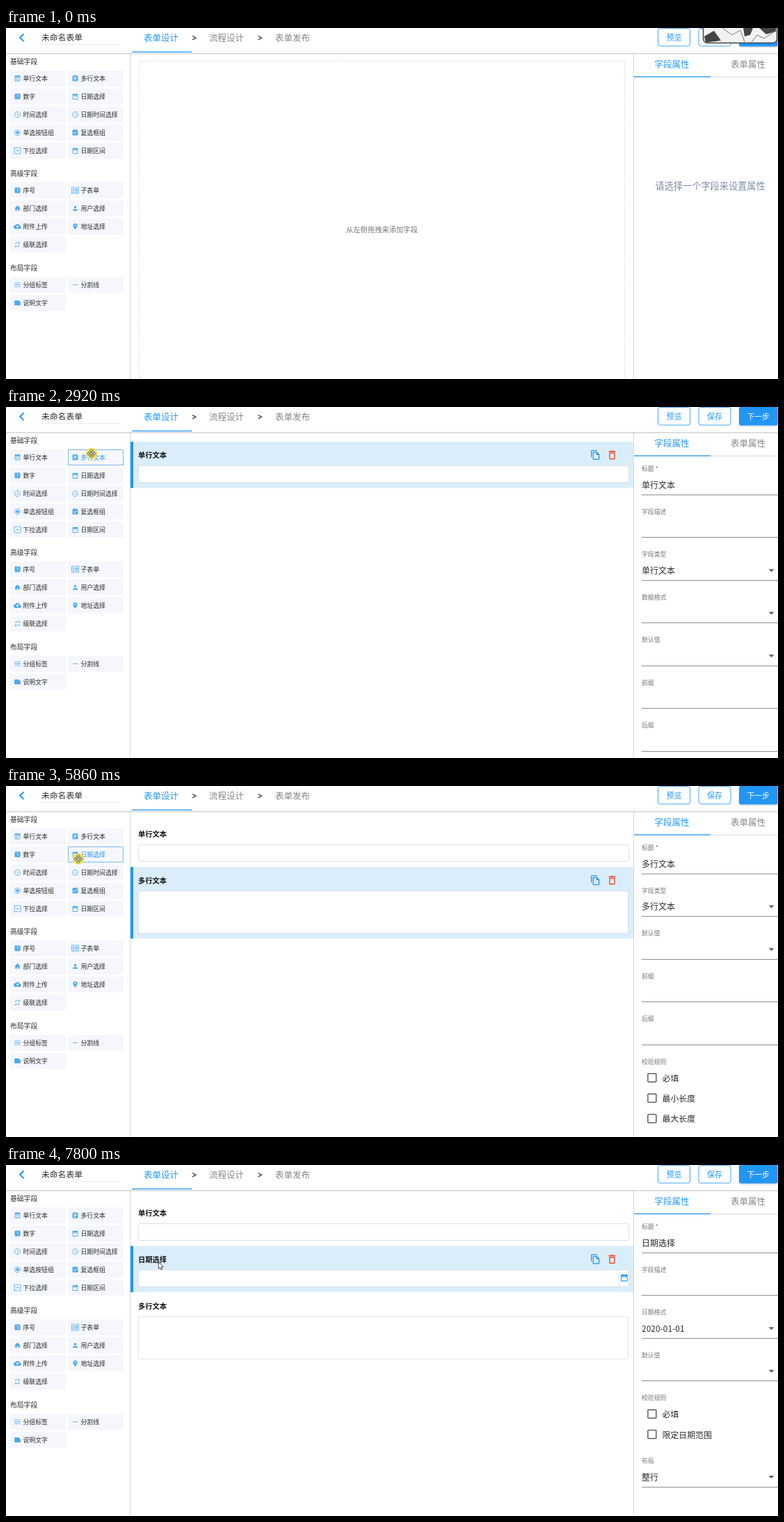
An HTML page that plays this animation: 1110 px wide and 505 px high, repeating every 8000 ms.

```html
<!DOCTYPE html>
<html lang="zh-CN">
<head>
<meta charset="utf-8">
<title>表单设计</title>
<style>
  html, body { margin: 0; width: 100%; height: 100%; overflow: hidden; background: #fff; }
  svg { display: block; }
  text { font-family: "Noto Sans CJK SC", "Noto Sans CJK", "Noto Sans", sans-serif; fill: #2a2a2a; white-space: pre; }
  .off { display: none; }
  .icon { fill: #4ba8f1; fill-rule: evenodd; }
  .item rect { fill: #f5f7fc; stroke: #f5f7fc; }
  .item.hot rect { stroke: #3c97e3; stroke-dasharray: 2 1; }
  .item.hot text { fill: #2f97ec; }
  text.blue, .blue { fill: #2196f3; }
  text.grey { fill: #858585; }
  text.label { fill: #757575; }
  text.hint { fill: #7f8ea6; }
  text.white { fill: #fff; }
  text.bold { font-weight: 700; fill: #111; }
  .thin { font-weight: 300; }
  .input { fill: #fff; stroke: #dcdfe3; }
  .tool { fill-rule: evenodd; }
</style>
</head>
<body>
<svg id="stage" width="1110" height="505" xmlns="http://www.w3.org/2000/svg"></svg>
<script>
const LOOP = 8000;

// Icons on a 24 unit grid
const SQUARE = 'M19 3H5a2 2 0 0 0-2 2v14a2 2 0 0 0 2 2h14a2 2 0 0 0 2-2V5a2 2 0 0 0-2-2z';
const RING = 'M12 2a10 10 0 1 0 0 20 10 10 0 0 0 0-20zm0 18a8 8 0 1 1 0-16 8 8 0 0 1 0 16z';
const ICONS = {
  note: 'M17 10H7v2h10zm2-7h-1V1h-2v2H8V1H6v2H5a2 2 0 0 0-2 2v14a2 2 0 0 0 2 2h14a2 2 0 0 0 2-2V5a2 2 0 0 0-2-2zm0 16H5V8h14zm-5-5H7v2h7z',
  task: 'M19 3h-4.2a3 3 0 0 0-5.6 0H5a2 2 0 0 0-2 2v14a2 2 0 0 0 2 2h14a2 2 0 0 0 2-2V5a2 2 0 0 0-2-2zm-7 0a1 1 0 1 1 0 2 1 1 0 0 1 0-2zm2 14H7v-2h7zm3-4H7v-2h10zm0-4H7V7h10z',
  one: SQUARE + 'M14 17h-2V9h-2V7h4z',
  date: 'M19 4h-1V2h-2v2H8V2H6v2H5a2 2 0 0 0-2 2v14a2 2 0 0 0 2 2h14a2 2 0 0 0 2-2V6a2 2 0 0 0-2-2zm0 16H5V9h14zM7 11h2v2H7zm4 0h2v2h-2zm4 0h2v2h-2z',
  time: RING + 'M12.5 7H11v6l5.2 3.1.8-1.2-4.5-2.7z',
  radio: RING + 'M12 7a5 5 0 1 0 0 10 5 5 0 0 0 0-10z',
  check: SQUARE + 'M10 17l-5-5 1.4-1.4 3.6 3.6 7.6-7.6L19 8z',
  drop: 'M1 1h22v22H1zM3 3v18h18V3zM7 10h10l-5 5z',
  sub: 'M0 1h24v22H0zM2 3v18h20V3zM4 6h6v2H4zM4 11h6v2H4zM4 16h6v2H4zM12 6h8v7h-8zM14 8v3h4V8zM12 16h8v2h-8z',
  home: 'M10 20v-6h4v6h5v-8h3L12 3 2 12h3v8z',
  user: 'M12 12a4 4 0 1 0 0-8 4 4 0 0 0 0 8zm0 2c-2.7 0-8 1.3-8 4v2h16v-2c0-2.7-5.3-4-8-4z',
  cloud: 'M19.4 10A7.5 7.5 0 0 0 5.4 8 6 6 0 0 0 6 20h13a5 5 0 0 0 .4-10zM14 13v4h-4v-4H7l5-5 5 5z',
  place: 'M12 2a7 7 0 0 0-7 7c0 5.2 7 13 7 13s7-7.8 7-13a7 7 0 0 0-7-7zm0 9.5a2.5 2.5 0 1 1 0-5 2.5 2.5 0 0 1 0 5z',
  loop: 'M7 7h10v3l4-4-4-4v3H5v6h2zm10 10H7v-3l-4 4 4 4v-3h12v-6h-2z',
  lines: 'M2 5h20v2H2zM2 11h20v2H2zM2 17h20v2H2z',
  minus: 'M4 11h16v2H4z',
  memo: 'M22 10l-6-6H4a2 2 0 0 0-2 2v12a2 2 0 0 0 2 2h16a2 2 0 0 0 2-2z',
  copy: 'M16 1H4a2 2 0 0 0-2 2v14h2V3h12zm-1 4H8a2 2 0 0 0-2 2v14a2 2 0 0 0 2 2h11a2 2 0 0 0 2-2V11zM8 21V7h6v5h5v9z',
  bin: 'M6 19a2 2 0 0 0 2 2h8a2 2 0 0 0 2-2V7H6zM8 9h8v10H8zm7.5-5-1-1h-5l-1 1H5v2h14V4z'
};

// Text is placed by the vertical middle of its glyphs
const text = (x, cy, size, str, cls = '') =>
  `<text x="${x}" y="${cy + size * 0.38}" font-size="${size}" class="${cls}">${str}</text>`;
const rect = (x, y, w, h, attrs) => `<rect x="${x}" y="${y}" width="${w}" height="${h}" ${attrs}/>`;
const stroke = (d, color, attrs = '') => `<path d="${d}" fill="none" stroke="${color}" ${attrs}/>`;
const icon = (name, cx, cy, size, attrs = 'class="icon"') =>
  `<path d="${ICONS[name]}" transform="translate(${cx - size / 2} ${cy - size / 2}) scale(${size / 24})" ${attrs}/>`;
const group = (id, body) => `<g id="${id}">${body}</g>`;

// Field palette: title, title middle, top of the first item, items
const GROUPS = [
  ['基础字段', 48, 61.5, [['单行文本', 'note'], ['多行文本', 'task'], ['数字', 'one'], ['日期选择', 'date'],
    ['时间选择', 'time'], ['日期时间选择', 'time'], ['单选按钮组', 'radio'], ['复选框组', 'check'],
    ['下拉选择', 'drop'], ['日期区间', 'date']]],
  ['高级字段', 209.5, 222.5, [['序号', 'one'], ['子表单', 'sub'], ['部门选择', 'home'], ['用户选择', 'user'],
    ['附件上传', 'cloud'], ['地址选择', 'place'], ['级联选择', 'loop']]],
  ['布局字段', 345.5, 358.5, [['分组标签', 'lines'], ['分割线', 'minus'], ['说明文字', 'memo']]]
];
const items = GROUPS.flatMap(([, , top, list]) => list.map(([name, pic], i) =>
  ({ name, pic, x: i % 2 ? 89.5 : 6.5, y: top + (i >> 1) * 26 })));

const item = ({ name, pic, x, y }, id, cls) =>
  `<g id="${id}" class="${cls}" transform="translate(${x} ${y})">` +
  rect(0, 0, 79, 22, '') + icon(pic, 10, 11, 10.5) + text(18, 11.2, 8.9, name) + '</g>';

const palette = GROUPS.map(([title, cy]) => text(6, cy, 9.8, title)).join('') +
  items.map((it, i) => item(it, 'item' + i, 'item')).join('');

// Header
const button = (x, label) =>
  rect(x + 0.5, 0.5, 46, 25.5, 'rx="3" fill="#fff" stroke="#42a5f5"') + text(x + 12.5, 13.5, 11, label, 'blue');
const header =
  rect(0, 0, 1110, 36, 'fill="#fff" filter="url(#shade)"') +
  stroke('M25.5 8.5L20 13.8l5.5 5.3', '#2196f3', 'stroke-width="2"') +
  text(51, 14, 11.8, '未命名表单') +
  stroke('M51 23.5H165', '#d5d5d5', 'stroke-dasharray="1 1"') +
  text(198, 14.5, 12.5, '表单设计', 'blue thin') + text(292, 14.5, 12.5, '流程设计', 'grey thin') +
  text(387, 14.5, 12.5, '表单发布', 'grey thin') +
  stroke('M268 11.5l5 2.7-5 2.7M362.5 11.5l5 2.7-5 2.7', '#333', 'stroke-width="1.2"') +
  rect(181, 33.8, 86, 1.3, 'class="blue"') +
  button(937, '预览') + button(995.5, '保存') +
  rect(1054, -0.5, 55.5, 27, 'rx="3" class="blue" filter="url(#shade)"') +
  text(1065.5, 13.5, 10.8, '下一步', 'white');

const picture = group('picture',
  rect(1002.5, -8, 106, 29.5, 'rx="6" fill="#f2f2f2" stroke="#444" stroke-width="1.5"') +
  '<path d="M1004 12l14-8 10 14-22 3zM1060 0h14l-4 10-8 2zM1083 0h24v5l-14 4z" fill="#444"/>' +
  stroke('M1030 0l14 10 12-7 6 17M1072 20l8-10 10 5 14-9', '#777'));

// Canvas cards
const tools = cy => icon('copy', 847.5, cy, 15.5, 'class="tool" fill="#2196f3"') +
  icon('bin', 871.5, cy, 17, 'class="tool" fill="#e8502f"');
const card = (y, h, title, selected, body) =>
  `<g transform="translate(0 ${y})">` +
  (selected ? rect(179, 0, 723, h, 'fill="#daedfb"') + rect(179, 0, 4, h, 'class="blue"') + tools(19) : '') +
  text(190, 19.5, 10.25, title, 'bold') + body + '</g>';
const line = selected => card(50, 66.5, '单行文本', selected, rect(190.5, 34.5, 705, 24, 'rx="2" class="input"'));
const area = (y, selected) => card(y, 103, '多行文本', selected, rect(190.5, 34.5, 704, 61, 'rx="2" class="input"'));
const day = y => card(y, 66.5, '日期选择', true,
  rect(190.5, 34.5, 705, 24, 'rx="2" class="input"') +
  stroke('M881.5 35v23', '#dcdfe3') + icon('date', 889, 45.5, 13, 'class="tool" fill="#2196f3"'));

const empty = rect(191.5, 47.5, 698, 480, 'fill="none" stroke="#dedede" stroke-dasharray="3 2"') +
  text(489, 290.2, 10.3, '从左侧拖拽来添加字段', 'label');
const slot = group('slot',
  rect(179.5, 116.5, 722, 28, 'fill="#fefefe" stroke="#a3c0d6" stroke-dasharray="2 1"'));

// Property panels
const prop = (row, label, value = '', select = false, shift = 0) => {
  const y = 88.8 + row * 61.5 + shift;
  return text(914, y, 8.9, label, 'label') + text(914, y + 23.5, 12, value) +
    stroke(`M914 ${Math.round(y + 37) + 0.5}H1110`, '#8f8f8f') +
    (select ? `<path d="M1096.5 ${y + 21.5}h8l-4 4z" fill="#616161"/>` : '');
};
const rules = (row, names) => {
  const y = 88.8 + row * 61.5;
  return text(914, y, 8.9, '校验规则', 'label') + names.map((name, i) => {
    const cy = y + 23.5 + i * 29.3;
    return rect(922.9, cy - 6, 12, 12, 'rx="1" fill="none" stroke="#5f5f5f" stroke-width="1.5"') +
      text(943.5, cy + 0.5, 11.9, name);
  }).join('');
};
const panels = [
  text(933.5, 226.5, 13.2, '请选择一个字段来设置属性', 'hint thin'),
  prop(0, '标题 *', '单行文本') + prop(1, '字段描述') + prop(2, '字段类型', '单行文本', true) +
    prop(3, '数据格式', '', true) + prop(4, '默认值', '', true) + prop(5, '前缀') + prop(6, '后缀'),
  prop(0, '标题 *', '多行文本') + prop(1, '字段类型', '多行文本', true) + prop(2, '默认值', '', true) +
    prop(3, '前缀') + prop(4, '后缀') + rules(5, ['必填', '最小长度', '最大长度']),
  prop(0, '标题 *', '日期选择') + prop(1, '字段描述') + prop(2, '日期格式', '2020-01-01', true) +
    prop(3, '默认值', '', true) + rules(4, ['必填', '限定日期范围']) + prop(5, '布局', '整行', true, 29.3)
];
const sides =
  stroke('M178.5 36V505M902.5 36V505M1013 70.5H1110', '#d9d9d9') +
  rect(903, 69.6, 110, 1.3, 'class="blue"') +
  text(932.5, 52.5, 12.5, '字段属性', 'blue thin') + text(1042, 52.5, 12.5, '表单属性', 'grey thin');

// Pointer
const CROSS = 'M0-6.5l2.5 2.7H.8V-.8H3.8V-2.5L6.5 0 3.8 2.5V.8H.8V3.8H2.5L0 6.5-2.5 3.8H-.8V.8H-3.8V2.5L-6.5 0-3.8-2.5V-.8H-.8V-3.8H-2.5z';
const pointer = group('pointer',
  '<circle id="halo" r="8.3" fill="#f3e83c" opacity=".85"/>' +
  `<path id="mover" d="${CROSS}" fill="#fff" stroke="#333" stroke-width=".8"/>` +
  '<path id="arrow" d="M.3.3V9.8L2.6 7.8 4.1 11.2 5.7 10.5 4.3 7.2H7.2z" fill="#fff" stroke="#333" stroke-width=".9"/>');

const scenes = [empty, line(true), line(false) + group('lower', area(116.5, true)),
  line(false) + day(116.5) + area(183.5, false)];

// Drags: palette item, start, end, grip offset
const DRAGS = [[0, 1320, 2010, -34, -5.5], [1, 2920, 3700, -34, -6], [3, 6320, 7800, -16, -15]];
const PRESSES = [[1170, 2010], [2920, 3620], [5860, 7710]];

// Pointer legs: start, end, steps, target x, target y, bow
const LEGS = [
  [70, 850, 11, 40.5, 66, 0], [1320, 1860, 8, 340, 93, 0], [2010, 2770, 11, 123, 67, 0],
  [2920, 3460, 8, 305, 168, 0], [3620, 4390, 11, 46, 99, 0], [5000, 5310, 5, 103, 104, 0],
  [5690, 5690, 1, 104, 105, 0], [6320, 7110, 11, 215.5, 142, 21], [7170, 7250, 2, 219, 139.5, 0]
];

document.getElementById('stage').innerHTML =
  '<defs><filter id="shade" x="-10%" y="-20%" width="120%" height="160%">' +
  '<feDropShadow dx="0" dy="1" stdDeviation="1" flood-opacity=".25"/></filter></defs>' +
  palette + sides + scenes.map((s, i) => group('scene' + i, s)).join('') + slot +
  panels.map((p, i) => group('panel' + i, p)).join('') + header + picture +
  DRAGS.map(([n], i) => item(items[n], 'ghost' + i, 'item hot')).join('') + pointer;

const el = id => document.getElementById(id);
const show = (id, on) => el(id).classList.toggle('off', !on);
const move = (id, x, y) => el(id).setAttribute('transform', `translate(${x} ${y})`);
const within = (v, a, b) => v >= a && v < b;

function pointerAt(t) {
  let x = 950, y = 406;
  for (const [t0, t1, n, tx, ty, bow] of LEGS) {
    if (t < t0) break;
    // The picture refreshes in discrete steps along each leg
    const k = n > 1 ? Math.min(1, Math.floor((t - t0) / (t1 - t0) * (n - 1) + 0.1) / (n - 1)) : 1;
    const p = k * k * (3 - 2 * k);
    x += (tx - x) * p;
    y += (ty - y) * p + bow * Math.sin(Math.PI * p);
  }
  return [x, y];
}

function draw(t) {
  const [x, y] = pointerAt(t);
  const stage = DRAGS.filter(([, , end]) => t >= end).length;
  const drag = DRAGS.findIndex(([, a, b]) => within(t, a, b));
  const pressed = PRESSES.some(([a, b]) => within(t, a, b));
  const hover = drag < 0 && t >= 70
    ? items.findIndex(it => within(x, it.x, it.x + 80) && within(y, it.y, it.y + 23)) : -1;
  const opening = drag > 0 && x > 184;

  scenes.forEach((_, i) => { show('scene' + i, i === stage); show('panel' + i, i === stage); });
  items.forEach((_, i) => el('item' + i).classList.toggle('hot', i === hover));
  DRAGS.forEach(([, , , dx, dy], i) => {
    show('ghost' + i, i === drag);
    if (i === drag) move('ghost' + i, Math.round(x + dx) + 0.5, Math.round(y + dy) + 0.5);
  });
  show('slot', opening);
  move('lower', 0, opening ? 29 : 0);
  show('picture', t < 1170);
  show('pointer', t >= 70);
  show('halo', pressed);
  show('mover', pressed || hover >= 0);
  show('arrow', !pressed && hover < 0);
  move('pointer', x, y);
}

function tick() {
  draw(performance.now() % LOOP);
  requestAnimationFrame(tick);
}
tick();
</script>
</body>
</html>
```
